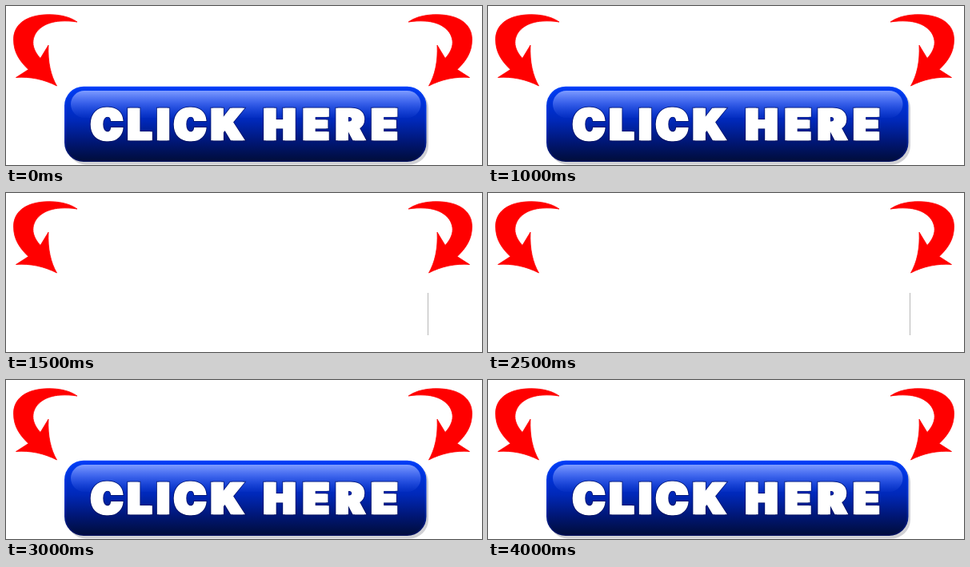
An HTML page that plays this animation: 595x199 px, repeating every 9 s.

```html
<!DOCTYPE html>
<html lang="en">
<head>
<meta charset="utf-8">
<title>Click here</title>
<style>
  html, body { margin: 0; width: 100%; height: 100%; overflow: hidden; background: #fff; }
  svg { display: block; width: 595px; height: 199px; }
  text {
    font: 900 52.5px Inter, "Liberation Sans", sans-serif;
    text-anchor: middle;
    stroke-linejoin: miter;
  }
  .edge { fill: #000b50; stroke: #000b50; stroke-width: 4.5; opacity: .6; }
  .face { fill: #fff; stroke: #fff; stroke-width: 2.7; }
</style>
</head>
<body>
<svg viewBox="0 0 595 199" xmlns="http://www.w3.org/2000/svg">
  <defs>
    <linearGradient id="rim" x2="0" y2="1">
      <stop offset="0" stop-color="#0040fa"/>
      <stop offset=".45" stop-color="#0430cc"/>
      <stop offset="1" stop-color="#000f58"/>
    </linearGradient>
    <linearGradient id="body" x2="0" y2="1">
      <stop offset="0" stop-color="#003cf4"/>
      <stop offset=".45" stop-color="#0028b8"/>
      <stop offset=".75" stop-color="#001674"/>
      <stop offset="1" stop-color="#000d3c"/>
    </linearGradient>
    <linearGradient id="gloss" x2="0" y2="1">
      <stop offset="0" stop-color="#7f9cff"/>
      <stop offset=".45" stop-color="#4c70f0" stop-opacity=".75"/>
      <stop offset="1" stop-color="#2c54dc" stop-opacity=".1"/>
    </linearGradient>
    <path id="arrow" fill="#f00" stroke="#f00" stroke-width=".8" d="M89 20C81 14 66 9.500 47 11C22 13 9.500 25 9.500 42C9.500 58 17 69 28 79.500L12.500 89.500C30 88 48 92 63.500 100C56 87 52 70 53 49L43 65.500C36 58 33 50 34 43C36 29 50 20 68 19C76 18.500 82 19 89 20Z"/>
    <text id="label" y="166.700" x="126 167 196.500 230 276.500 309 342 387.500 430 473">CLICK HERE</text>
    <g id="wide">
      <use href="#label" x="-1.200"/>
      <use href="#label" x="1.200"/>
    </g>
  </defs>
  <rect width="595" height="199" fill="#fff"/>
  <use href="#arrow"/>
  <use href="#arrow" transform="translate(592 0) scale(-1 1)"/>
  <rect id="sliver" x="527" y="125" width="1" height="53" fill="#b8b8b8"/>
  <g id="button">
    <rect x="76" y="104" width="452" height="94.500" rx="24" fill="#d0d0d4"/>
    <rect x="73" y="100.700" width="452.500" height="94.300" rx="24" fill="url(#rim)"/>
    <rect x="75" y="102.500" width="448.500" height="91" rx="22" fill="url(#body)"/>
    <rect x="81" y="106" width="437.500" height="34" rx="17" fill="url(#gloss)"/>
    <use href="#wide" class="edge"/>
    <use href="#wide" class="face"/>
  </g>
</svg>
<script>
  const LOOP = 9000, HALF = 500, BLINK_END = 4000;
  const button = document.getElementById("button");
  const sliver = document.getElementById("sliver");
  const show = (el, on) => el.setAttribute("visibility", on ? "visible" : "hidden");

  // The button blinks four times, then rests until the loop ends.
  function draw(now) {
    const t = now % LOOP;
    const on = t >= BLINK_END || Math.floor(t / HALF) % 2 === 0;
    show(button, on);
    show(sliver, !on);
  }

  const start = performance.now();
  function tick() {
    draw(performance.now() - start);
    requestAnimationFrame(tick);
  }
  tick();
</script>
</body>
</html>
```
